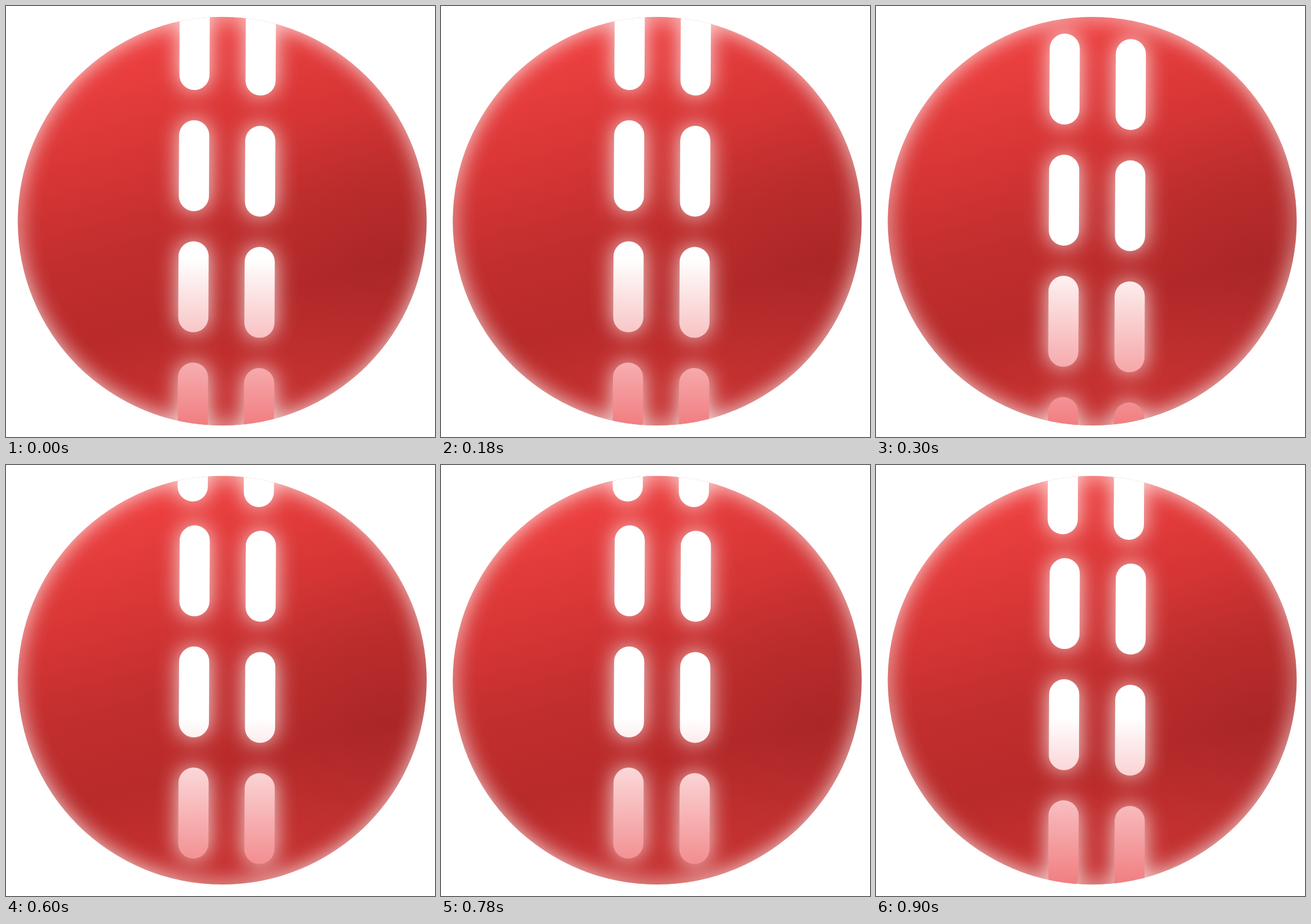
Write an HTML page that moves like this. It is 746 px wide and 750 px high and loops after 1200 ms.

```html
<!DOCTYPE html>
<html lang="en">
<head>
<meta charset="utf-8">
<title>Moving capsules</title>
<style>
  html, body { margin: 0; width: 100%; height: 100%; overflow: hidden; background: #fff; }
  svg { display: block; width: 100%; height: 100%; }
</style>
</head>
<body>
<svg viewBox="0 0 746 750">
  <defs>
    <linearGradient id="base" gradientUnits="userSpaceOnUse" x1="34" y1="126" x2="192" y2="718">
      <stop offset="0" stop-color="#ed4040"/>
      <stop offset=".28" stop-color="#d83636"/>
      <stop offset=".53" stop-color="#c22e2e"/>
      <stop offset=".77" stop-color="#b92a2a"/>
      <stop offset="1" stop-color="#c63131"/>
    </linearGradient>
    <radialGradient id="shade" gradientUnits="userSpaceOnUse" cx="660" cy="460" r="290">
      <stop offset="0" stop-opacity=".08"/>
      <stop offset="1" stop-opacity="0"/>
    </radialGradient>
    <linearGradient id="fade" gradientUnits="userSpaceOnUse" x1="0" y1="440" x2="0" y2="730">
      <stop offset="0" stop-color="#fff"/>
      <stop offset="1" stop-color="#f17d80"/>
    </linearGradient>
    <filter id="blur" filterUnits="userSpaceOnUse" x="0" y="0" width="746" height="750">
      <feGaussianBlur stdDeviation="19"/>
    </filter>
    <clipPath id="ball"><circle cx="376" cy="374.5" r="355.5"/></clipPath>
  </defs>
  <g clip-path="url(#ball)">
    <path fill="url(#base)" d="M0 0h746v750H0z"/>
    <path fill="url(#shade)" d="M0 0h746v750H0z"/>
    <!-- glow from everything outside the red shape -->
    <g filter="url(#blur)" fill="#fff" opacity=".85">
      <path fill-rule="evenodd" d="M0 0h746v750H0zM20.5 374.5a355.5 355.5 0 0 0 711 0a355.5 355.5 0 0 0-711 0z"/>
      <path class="bars"/>
    </g>
    <path class="bars" fill="url(#fade)"/>
  </g>
</svg>
<script>
const bars = document.querySelectorAll('.bars');
const STEP = 300, STEPS = 4, PITCH = 210.8, WRAP = 832;
let shown = -1;

const capsule = (x, y) =>
  `M${x} ${y + 26.2}a26.2 26.2 0 0 1 52.4 0l-.5 105.8a26.2 26.2 0 0 1-52.4 0z`;

function draw(step) {
  const shift = step ? 57 * step + 3 : 0;
  let d = '';
  for (let i = 0; i < 4; i++) {
    const x = 302 - i;
    let y = -12 + i * PITCH + shift;
    if (y > 730) y -= WRAP;
    d += capsule(x, y) + capsule(x + 115, y + 9.6);
  }
  bars.forEach(bar => bar.setAttribute('d', d));
}

function tick() {
  const step = Math.floor(performance.now() / STEP) % STEPS;
  if (step !== shown) draw(shown = step);
  requestAnimationFrame(tick);
}
tick();
</script>
</body>
</html>
```
